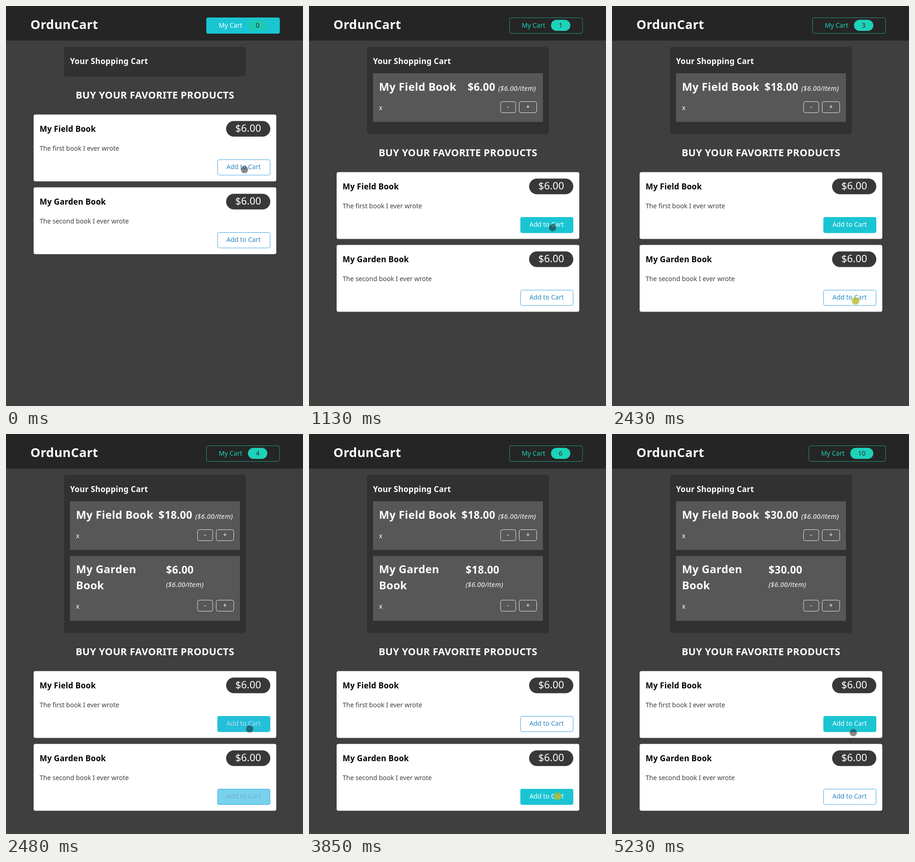
An HTML page with a canvas that plays this animation: 645 px wide and 868 px high, repeating every 5.29 s.

```html
<!DOCTYPE html>
<html lang="en">
<head>
<meta charset="utf-8">
<title>Shopping cart</title>
<style>
  html, body { margin: 0; width: 100%; height: 100%; overflow: hidden; background: #3f3f3f; }
  canvas { display: block; }
</style>
</head>
<body>
<canvas id="stage" width="645" height="868"></canvas>
<script>
const ctx = document.getElementById('stage').getContext('2d');
const LOOP = 5290;
const FADE = 160;
const CYAN = [26, 197, 211], WHITE = [255, 255, 255], LINK = [44, 136, 194];
const TEAL = [30, 209, 184];

const books = [
  { title: 'My Field Book', about: 'The first book I ever wrote' },
  { title: 'My Garden Book', about: 'The second book I ever wrote' },
];

// Each click: press time, release time, index of the book
const clicks = [
  [100, 200, 0], [1190, 1240, 0], [1650, 1740, 0],
  [2430, 2480, 1], [3100, 3160, 1], [3360, 3450, 1], [3850, 3950, 1], [4430, 4480, 1],
  [4850, 4930, 0], [4980, 5030, 0],
];

// Pointer keys: time, x, y
const pointerPath = [
  [0, 518, 355], [230, 518, 356], [620, 529, 472], [830, 529, 481],
  [1760, 529, 481], [2030, 529, 624], [2180, 529, 624], [2380, 529, 640],
  [2560, 529, 640], [2850, 540, 786], [4540, 540, 786], [4820, 524, 648], [LOOP, 524, 648],
];

const clamp = v => Math.min(1, Math.max(0, v));
const mix = (a, b, p) => a + (b - a) * p;
const blend = (a, b, p) => `rgb(${a.map((v, i) => Math.round(mix(v, b[i], p))).join(',')})`;
const money = n => '$' + (n * 6).toFixed(2);

function box(x, y, w, h, r, fill, stroke) {
  ctx.beginPath();
  const inset = stroke ? 0.5 : 0;
  ctx.roundRect(x + inset, y + inset, w - 2 * inset, h - 2 * inset, r);
  if (fill) { ctx.fillStyle = fill; ctx.fill(); }
  if (stroke) { ctx.strokeStyle = stroke; ctx.lineWidth = 1; ctx.stroke(); }
}

function text(str, x, y, size, { color = '#fff', style = '', align = 'left', spacing = 0 } = {}) {
  ctx.font = `${style} ${size}px "Noto Sans", sans-serif`;
  ctx.letterSpacing = `${spacing * size}px`;
  ctx.textAlign = align;
  ctx.fillStyle = color;
  ctx.fillText(str, x, y);
}

const bold = (str, x, y, size, options) =>
  text(str, x, y, size, { style: 'bold', spacing: 0.012, ...options });

const italic = (str, x, y) => text(str, x, y, 14.6, { style: 'italic', spacing: 0.02 });

// Share of the filled, focused look of a product button
function focusAmount(index, t) {
  let amount = 0, focused = -1;
  for (const [press, , book] of clicks) {
    if (press > t || book === focused) continue;
    const p = clamp((t - press) / FADE);
    if (book === index) amount = p;
    else if (focused === index) amount = 1 - p;
    focused = book;
  }
  return amount;
}

function drawHeader(total, t) {
  box(0, 0, 645, 75, 0, '#252525');
  bold('OrdunCart', 53, 49.5, 27.2);
  const fill = 1 - clamp((t - 100) / 100);
  const extra = total > 9 ? 8 : 0;
  box(435 - extra, 25, 159.5 + extra, 35, 4, null, '#26957f');
  if (fill > 0) {
    ctx.globalAlpha = fill;
    box(435, 25, 159.5, 35, 4, '#1ac5d3');
    ctx.globalAlpha = 1;
  }
  text('My Cart', 462 - extra, 46.5, 14, { color: blend(TEAL, WHITE, fill) });
  box(525.5 - extra, 30, 42 + extra, 24, 12, blend([29, 210, 185], [30, 202, 180], fill));
  text(String(total), 546.5 - extra / 2, 46.5, 14, { color: '#2b2b2b', align: 'center' });
}

function drawQuantity(y) {
  text('x', 152, y + 19, 14);
  box(415.5, y, 34, 25, 4, null, '#e8e8e8');
  box(456, y, 39, 25, 4, null, '#e8e8e8');
  text('-', 432.5, y + 17, 14, { align: 'center' });
  text('+', 475.5, y + 17, 14, { align: 'center' });
}

function drawCart([first, second], shift) {
  box(126, 88.5, 395, 64.5 + shift, 5, '#313131');
  bold('Your Shopping Cart', 139, 125.5, 17.2);
  if (first) {
    box(139, 146, 369, 105.5, 0, '#575757');
    bold(books[0].title, 152, 183.5, 23.7);
    bold(money(first), 404.5, 183.5, 22.8, { align: 'right' });
    italic('($6.00/item)', 411, 183.5);
    drawQuantity(207);
  }
  if (second) {
    box(139, 264.5, 369, 141, 0, '#575757');
    const split = books[1].title.lastIndexOf(' ');
    bold(books[1].title.slice(0, split), 152, 302, 23.7);
    bold(books[1].title.slice(split + 1), 152, 336.5, 23.7);
    const x = second > 1 ? 340 : 347.5;
    bold(money(second), x, 302.5, 22.8);
    italic('($6.00/item)', x, 332);
    drawQuantity(360);
  }
}

function drawProduct({ title, about }, y, focus) {
  box(60, y, 527, 145, 4, '#fff');
  bold(title, 73, y + 37.5, 17.2, { color: '#000' });
  box(478, y + 14, 96, 34, 17, '#383838');
  text('$6.00', 526, y + 37.5, 21.9, { align: 'center' });
  text(about, 73, y + 78.5, 14, { color: '#3f3f3f' });
  box(459, y + 97.5, 115, 34.5, 4, null, '#45a3e0');
  if (focus > 0) {
    ctx.globalAlpha = clamp(focus * 2);
    box(459, y + 97.5, 115, 34.5, 4, blend([56, 180, 231], CYAN, focus));
    ctx.globalAlpha = 1;
  }
  text('Add to Cart', 516, y + 118.5, 14, { color: blend(LINK, WHITE, focus), align: 'center' });
}

function drawPointer(t) {
  const next = Math.max(1, pointerPath.findIndex(key => key[0] > t));
  const [t0, x0, y0] = pointerPath[next - 1];
  const [t1, x1, y1] = pointerPath[next];
  const p = clamp((t - t0) / (t1 - t0));
  const eased = p * p * (3 - 2 * p);
  const pressed = clicks.some(([press, release]) => t >= press && t < release);
  const dot = (r, color) => {
    ctx.beginPath();
    ctx.arc(mix(x0, x1, eased), mix(y0, y1, eased), r, 0, 2 * Math.PI);
    ctx.fillStyle = color;
    ctx.fill();
  };
  dot(9, pressed ? 'rgba(190,190,50,.4)' : 'rgba(90,90,90,.22)');
  dot(7.5, pressed ? 'rgba(180,180,30,.6)' : 'rgba(0,0,0,.38)');
}

function draw(t) {
  const counts = [0, 1].map(i => clicks.filter(([, up, book]) => book === i && up <= t).length);
  const shift = counts[1] ? 279 : counts[0] ? 125 : 0;
  box(0, 0, 645, 868, 0, '#3f3f3f');
  drawHeader(counts[0] + counts[1], t);
  drawCart(counts, shift);
  bold('BUY YOUR FAVORITE PRODUCTS', 323.5, 200.5 + shift, 21.4, { align: 'center' });
  books.forEach((book, i) => drawProduct(book, 235.5 + shift + i * 158, focusAmount(i, t)));
  drawPointer(t);
}

const start = performance.now();
function tick() {
  draw((performance.now() - start) % LOOP);
  requestAnimationFrame(tick);
}
tick();
</script>
</body>
</html>
```
